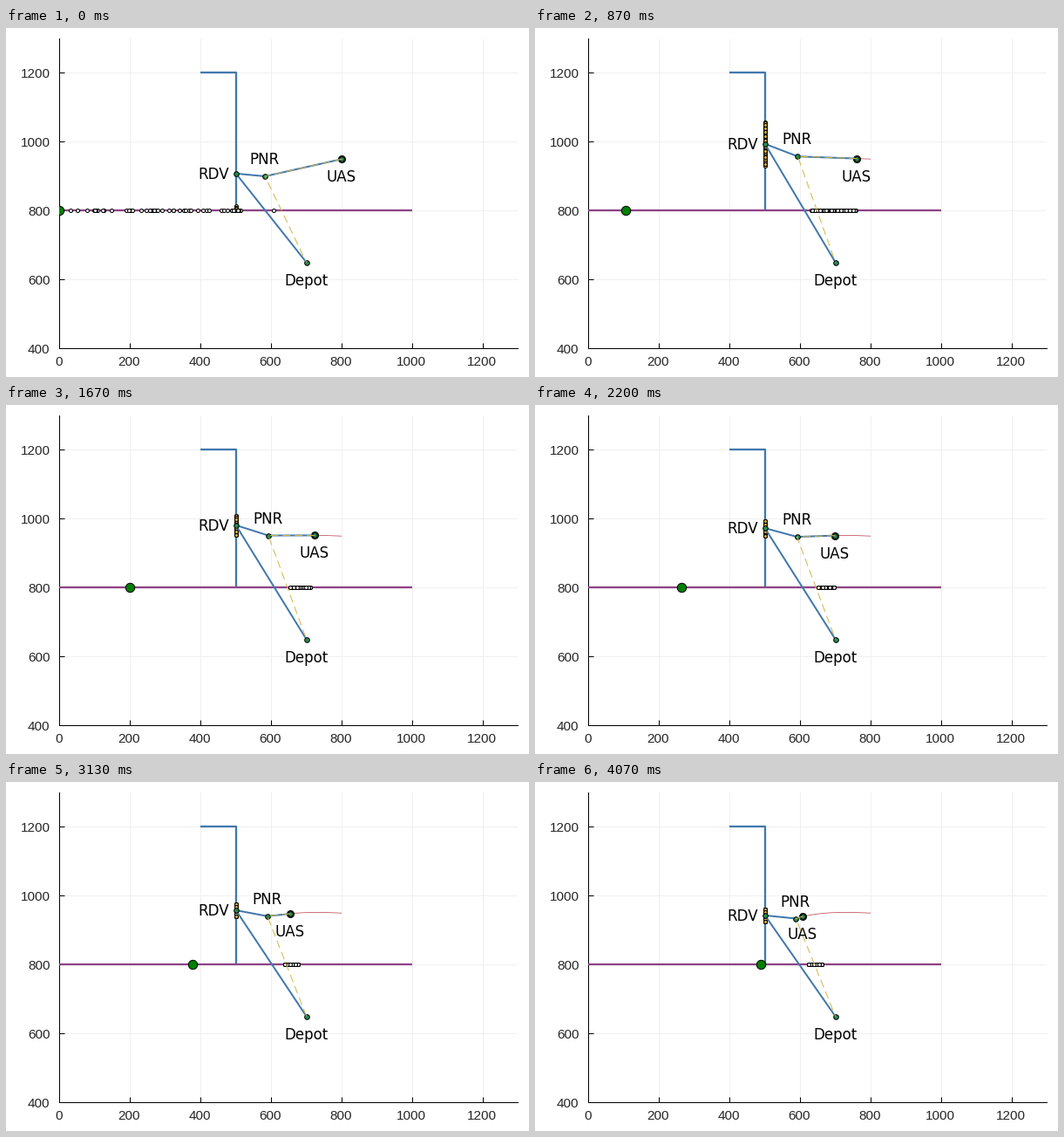
Recreate the animation shown at these times as a matplotlib script. Size 600 px wide and 400 px high, loop 4140 ms.

```python
import numpy as np
import matplotlib.pyplot as plt
from matplotlib.animation import FuncAnimation

DPI, W, H = 100, 600, 400
PX = 72 / DPI            # points per pixel
TICK, LOOP = 20, 4140    # ms
RATE, STEPS = 15, 62     # simulation steps per second, steps in a loop

BLUE, PURPLE, GOLD = "#4178ad", "#8e4486", "#d2b548"
GREEN, RED = "#008000", "#c4505c"
DEPOT = (700, 650)

COUNT, REACH = 52, 800   # particles and the farthest they may travel
rng = np.random.default_rng(4)
START = np.sort(rng.uniform(10, 525, COUNT))
START[-1] = 608
RANK = np.linspace(0, 1, COUNT)
ORDER = rng.permutation(COUNT)


def unsettled(k):
    """Share of the initial guess still left at step k."""
    return np.exp(-k / 1.5)


def rendezvous(k):
    return 500, 1008 - 1.06 * k - 100 * unsettled(k)


def no_return(k):
    return 594.5 - .11 * k - 12 * unsettled(k), 964 - .49 * k - 64 * unsettled(k)


def flight(k):
    return 800 - 3 * k - .0027 * k**2, 950 + .132 * k - 7.96e-5 * k**3


def particles(k):
    """Distances along the road, narrowing around the rendezvous."""
    center = 708 - 1.06 * k
    spread = 18 + 230 * np.exp(-k / 8)
    levels = round(5 + 200 * np.exp(-k / 7))
    rank = np.round(RANK * levels) / levels
    cloud = np.minimum(center + spread * (2 * rank - 1), REACH)
    e = unsettled(k)
    return (e * START + (1 - e) * cloud)[ORDER]


fig = plt.figure(figsize=(W / DPI, H / DPI), dpi=DPI, facecolor="white")
# Just under half a pixel, so that lines snap to the lower pixel
ax = fig.add_axes([61.49 / W, 32.51 / H, 526 / W, 355.5 / H])
ax.set(xlim=(0, 1300), ylim=(400, 1300),
       xticks=range(0, 1300, 200), yticks=range(400, 1300, 200))
ax.spines[["top", "right"]].set_visible(False)
ax.spines[["left", "bottom"]].set_linewidth(PX)
ax.tick_params(direction="in", length=6 * PX, width=PX,
               labelbottom=False, labelleft=False)
ax.grid(color="#f0f0f0", linewidth=PX)
ax.set_axisbelow(True)


def line(xs, ys, color, width, z, **kw):
    return ax.plot(xs, ys, color=color, lw=width * PX, zorder=z,
                   solid_capstyle="butt", **kw)[0]


def dots(fill, radius, z):
    return ax.plot([], [], "o", ms=2 * radius * PX, mfc=fill, mec="black",
                   mew=PX, zorder=z)[0]


def note(text, xy, dx, dy, size=16.6, font="DejaVu Sans", color="black",
         ha="center"):
    return ax.annotate(text, xy, (dx * PX, dy * PX),
                       textcoords="offset points", ha=ha, va="baseline",
                       fontsize=size * PX, family=font, color=color,
                       annotation_clip=False, zorder=20)


tick_font = dict(size=15.2, font="Liberation Sans", color="#262626")
for v in range(0, 1300, 200):
    note(str(v), (v, 400), -1, -20, **tick_font)
for v in range(400, 1300, 200):
    note(str(v), (0, v), -11, -5.5, ha="right", **tick_font)

# Candidate roads
line([500, 500, 400], [800, 1200, 1200], BLUE, 2.3, 3)
line([0, 1000], [800, 800], PURPLE, 2.3, 3)

gold = dots("#e0b243", 2, 4)
pale = dots("#eeeeee", 2, 5)
truck = dots(GREEN, 5.2, 6)
trail = line([], [], RED, .8, 7)
drone = dots("#20602c", 4, 8)
path = line([], [], BLUE, 2, 9)
nodes = dots("#258a4c", 2.8, 10)
plan = line([], [], GOLD, 1, 11, ls=(0, (9, 5)))

note("Depot", DEPOT, -.5, -26)
rdv_note = note("RDV", (500, 900), -26, -6)
pnr_note = note("PNR", (500, 900), -.5, 14)
uas_note = note("UAS", (500, 900), -.5, -26)


def update(i):
    # The pose shown is the one reached by the end of the tick
    k = min(int((i * TICK + TICK - 1) * RATE / 1000), STEPS - 1)
    rdv, pnr, uas = rendezvous(k), no_return(k), flight(k)

    d = particles(k)
    turned = d[d >= 500]
    pale.set_data(d, np.full_like(d, 800))
    gold.set_data(np.full_like(turned, 500), turned + 300)

    truck.set_data([8 * k], [800])
    trail.set_data(*flight(np.arange(k + 1)))
    drone.set_data(*zip(uas))
    path.set_data(*zip(uas, pnr, rdv, DEPOT))
    nodes.set_data(*zip(uas, pnr, rdv, DEPOT))
    plan.set_data(*zip(uas, pnr, DEPOT))
    rdv_note.xy, pnr_note.xy, uas_note.xy = rdv, pnr, uas
    return pale, gold, truck, trail, drone, path, nodes, plan


anim = FuncAnimation(fig, update, frames=LOOP // TICK, interval=TICK,
                     repeat=True, repeat_delay=0, blit=False)
plt.show()
```
